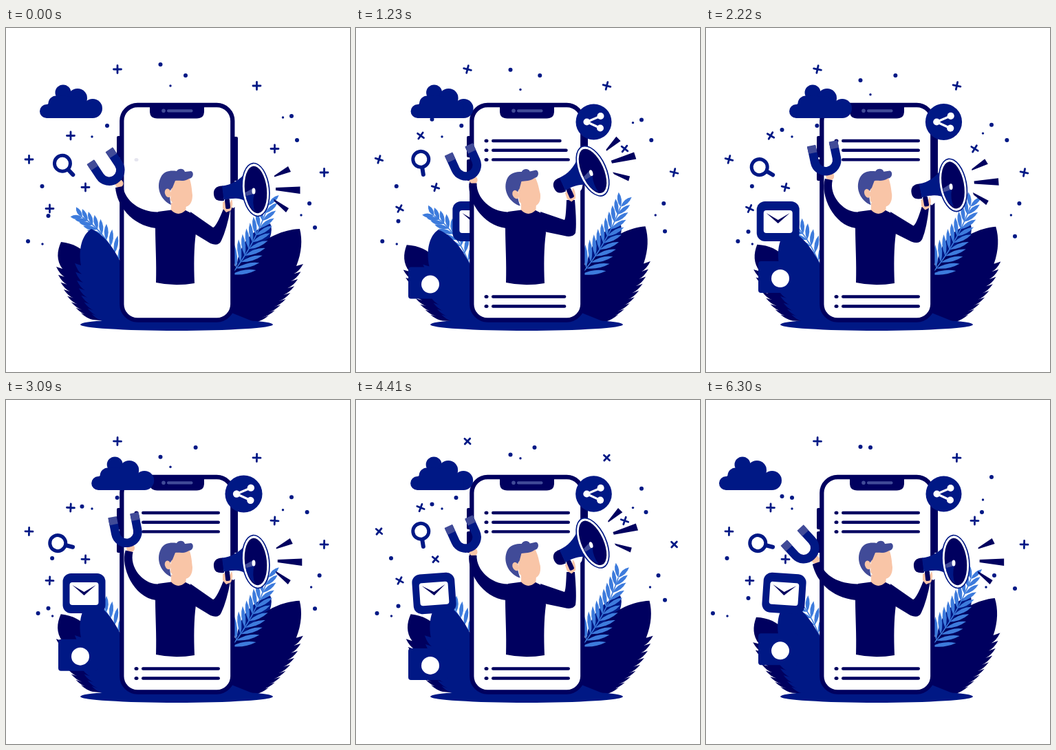
Animation, 500 px wide and 500 px high, one loop 6330 ms. Source, as an HTML page:

```html
<!DOCTYPE html>
<html lang="en">
<head>
<meta charset="utf-8">
<title>Mobile marketing</title>
<style>
  html, body { margin: 0; width: 100%; height: 100%; overflow: hidden; background: #fff; }
  svg { display: block; width: 100vw; height: 100vh; }
  .dark { fill: #00005f; }
  .blue { fill: #001885; }
  .soft { fill: #414b98; }
  .skin { fill: #f9c5a7; }
  .fern { fill: #3d7bdc; }
  .white { fill: #fff; }
</style>
</head>
<body>
<svg viewBox="0 0 500 500">
  <g id="fernL" class="fern"></g>
  <path id="leafL" class="dark"/>
  <path id="leafBlue" class="blue"/>
  <path id="leafBack" class="blue" d="M335 347Q340 300 384 284Q392 300 366 337Z"/>
  <path id="leafR" class="dark"/>
  <g id="fernR" class="fern"></g>
  <ellipse class="blue" cx="248" cy="431" rx="140" ry="9"/>
  <path class="blue" d="M300 430L328 414L368 430Z"/>

  <g id="camera">
    <rect class="blue" x="76" y="-23" width="58" height="46" rx="4"/>
    <circle class="white" cx="108" cy="2" r="13"/>
  </g>
  <g id="mail">
    <rect class="blue" x="-31" y="-29" width="62" height="58" rx="12"/>
    <rect class="white" x="-21" y="-16" width="42" height="33" rx="4"/>
    <path class="dark" d="M-17 -12L0 -2 17 -12 0 3Z"/>
  </g>
  <g id="marks" class="blue"></g>

  <g class="dark">
    <rect x="161" y="157" width="8" height="31" rx="2"/>
    <rect x="161" y="191" width="8" height="31" rx="2"/>
    <rect x="329" y="158" width="8" height="64" rx="2"/>
  </g>
  <rect x="168.300" y="112" width="161" height="312.500" rx="23" fill="#fff" stroke="#00005f" stroke-width="6.300"/>
  <path class="dark" d="M209 113H288V121Q288 131.500 277 131.500H220Q209 131.500 209 121Z"/>
  <circle class="soft" cx="229" cy="120.300" r="2.800"/>
  <rect class="soft" x="234" y="118.200" width="37.500" height="4.300" rx="2"/>
  <g id="list" class="dark"></g>

  <g id="cloud" class="blue">
    <circle cx="59" cy="121" r="10"/><circle cx="73" cy="110" r="11.500"/>
    <circle cx="83" cy="94" r="11.500"/><circle cx="104" cy="102" r="14"/>
    <circle cx="126" cy="117" r="14"/>
    <path d="M59 131V112L75 98 104 100 126 112V131Z"/>
  </g>

  <g id="lens" fill="none" stroke="#001885">
    <circle cx="-23.500" cy="0" r="11.500" stroke-width="5"/>
    <path d="M-11 0H-1" stroke-width="6" stroke-linecap="round"/>
  </g>

  <path class="skin" d="M240 254L262 256 261 268Q251 276 240 267Z"/>
  <path class="dark" d="M221 267L240 264.500Q250 275 261 265L273 271 276 298C273 320 273 345 274 371Q245 376 218 370C219 340 217 315 217 290Z"/>
  <g id="head">
    <path class="skin" d="M241 222L266 217C270 227 270 236 271 243C271 253 267 260 259 260C251 261 243 257 239 250Z"/>
    <path class="soft" d="M240 257C226 251 217 233 225 217C230 207 240 207 248 208C251 203 259 204 260 209L269 208C274 210 272 219 266 219C258 224 252 221 246 222L242 232C236 236 238 250 240 257Z"/>
    <ellipse class="skin" cx="235.500" cy="240" rx="4.500" ry="6.500" transform="rotate(-18 235 240)"/>
  </g>

  <g id="magnet">
    <ellipse class="skin" cx="164.500" cy="226" rx="6" ry="6"/>
    <g transform="translate(138.500 189) rotate(-33.500)">
      <path d="M-16.200 -3V21A16.200 16.200 0 0 0 16.200 21V-3" fill="none" stroke="#001885" stroke-width="12.500"/>
      <path class="soft" d="M-22.500 -4H-10V7H-22.500ZM10 -4H22.500V7H10Z"/>
    </g>
  </g>
  <path id="armL" class="dark"/>

  <path id="armR" class="dark"/>
  <g id="horn">
    <path class="white" d="M315 249L345 246 340 255 330 262 318 252Z"/>
    <path class="skin" d="M315 253L319 251 322 261 328 249Q331 255 327 265L320 268 315 262Z"/>
    <rect class="dark" x="318.500" y="248" width="7" height="15" rx="2" transform="rotate(-6 322 255)"/>
    <path class="dark" d="M315 229.500C306 229 301 234 302 242C303 250 308 252 317 251Z"/>
    <path class="blue" d="M314 229.500C328 228 338 222 350 209L353 255C342 246 330 247 316.500 249.500Z"/>
    <g transform="rotate(-6 363 235)">
      <ellipse class="blue" cx="363" cy="235" rx="20.500" ry="39.500"/>
      <ellipse class="white" cx="363" cy="235" rx="18.800" ry="37.800"/>
      <ellipse class="dark" cx="363" cy="235" rx="16" ry="34.500"/>
    </g>
    <path class="blue" d="M348 241L361 240Q357 255 362 267Q350 258 348 241Z"/>
    <path class="soft" d="M348 239L359 233 361 241 349 244Z"/>
    <ellipse class="white" cx="360" cy="237" rx="2.500" ry="4.500"/>
    <path id="beams" class="dark" d="M390 214.500L410 201 414 209 390 216.500ZM392 232L427.500 230.500V241L392 236ZM389 248.500L411 262 407 268 390 252Z"/>
  </g>

  <g id="share">
    <circle class="blue" r="26"/>
    <path d="M10 -8.500L-10 0 9.500 9" fill="none" stroke="#fff" stroke-width="3.200"/>
    <circle class="white" cx="-10" r="5"/><circle class="white" cx="10" cy="-8.500" r="5"/>
    <circle class="white" cx="9.500" cy="9" r="5"/>
  </g>
</svg>
<script>
const LOOP = 6330, HALF = LOOP / 2;
const $ = id => document.getElementById(id);
const place = (el, value) => el.setAttribute('transform', value);
const mix = (a, b, k) => a + (b - a) * k;

function add(parent, tag, attrs) {
  const el = document.createElementNS('http://www.w3.org/2000/svg', tag);
  for (const name in attrs) el.setAttribute(name, attrs[name]);
  return parent.appendChild(el);
}

// Eased progress from 0 to 1 between two times
function ramp(t, from, to) {
  const x = Math.min(1, Math.max(0, (t - from) / (to - from)));
  return x * x * x * (6 * x * x - 15 * x + 10);
}

// From 0 to a high point, then to a last value at the end of the loop
const swing = (t, peak, high, last) => high * ramp(t, 0, peak) + (last - high) * ramp(t, peak, LOOP);

// Up and back down, then rest, once per half loop
const pulse = t => ramp(t % HALF, 0, 1300) - ramp(t % HALF, 1300, 2720);

const curve = ([x0, y0, cx, cy, x1, y1], u) => {
  const v = 1 - u;
  return [v * v * x0 + 2 * u * v * cx + u * u * x1, v * v * y0 + 2 * u * v * cy + u * u * y1];
};

// Feathered edge along a curve; each tooth points out by dx
function teeth(edge, count, dx) {
  let d = '';
  for (let i = 0; i < count; i++) {
    const [x, y] = curve(edge, i / count), [nx, ny] = curve(edge, (i + 1) / count);
    d += `L${x} ${y}L${x + dx} ${y - 3}Q${mix(x, nx, 0.6) + dx * 0.6} ${mix(y, ny, 0.7)} ${nx} ${ny}`;
  }
  return d;
}
$('leafL').setAttribute('d', 'M168 400L120 332C110 320 98 313 80 311C74 324 73 338 82 350' +
  teeth([82, 350, 92, 398, 126, 424], 8, -9) + 'L168 428Z');
$('leafBlue').setAttribute('d', 'M185 428L168 343C158 322 144 301 124 292C110 301 105 322 109 345' +
  teeth([109, 345, 112, 398, 140, 426], 8, -9) + 'Z');
$('leafR').setAttribute('d', 'M310 428L328 347C340 344 350 336 365 319C378 305 402 293 427 292C431 308 430 326 422 346' +
  teeth([422, 346, 408, 398, 362, 428], 9, 10) + 'Z');

function fern(group, stem, count, size) {
  const [x0, y0, cx, cy, x1, y1] = stem;
  add(group, 'path', { d: `M${x0} ${y0}Q${cx} ${cy} ${x1} ${y1}`, fill: 'none', stroke: '#3d7bdc', 'stroke-width': 1.5 });
  for (let i = 0; i <= count; i++) {
    const u = i / count, len = size * (1 - 0.4 * u);
    const [x, y] = curve(stem, u), [nx, ny] = curve(stem, u + 0.01);
    const angle = Math.atan2(ny - y, nx - x) * 180 / Math.PI;
    for (const side of [-1, 1]) {
      add(group, 'path', {
        d: `M0 0Q${len * 0.55} -6.500 ${len} 0Q${len * 0.5} 5.500 0 0`,
        transform: `translate(${x} ${y}) rotate(${angle + side * (42 - 14 * u)})`,
      });
    }
  }
}
fern($('fernL'), [168, 350, 146, 296, 111, 275], 9, 29);
fern($('fernR'), [328, 358, 362, 315, 381, 258], 10, 36);

// Dots: x, y, radius, grouped by how they drift
const BIG = 3, SMALL = 1.7;
const slide = t => [swing(t, 2700, 15, -22), 0];
const fall = t => [0, swing(t, 3400, 30, 15)];
const bob = t => [0, swing(t, 2750, 13.5, -16)];
const drifts = [
  [slide, [147, 142, BIG], [261, 69, BIG], [441, 255, BIG], [53, 314, SMALL],
    [52.5, 230, BIG], [32, 310, BIG], [423, 163, BIG], [429, 272, SMALL]],
  [fall, [224.5, 53, BIG], [110.5, 125, BIG], [61.5, 273, BIG], [402.5, 130, SMALL]],
  [bob, [415, 128, BIG], [449, 290, BIG], [239, 84, SMALL]],
  [() => [0, 0], [125, 158, SMALL]],
].map(([move, ...dots]) => {
  const group = add($('marks'), 'g', {});
  for (const [cx, cy, r] of dots) add(group, 'circle', { cx, cy, r });
  return { move, group };
});

// Plus signs: x, y, tilt in the first half; the second half takes the rest of 60 degrees
const pluses = [
  [162, 60, 15], [364.5, 84, 15], [33.5, 191, 18], [94, 156.5, 38],
  [115.5, 231.5, 18], [63.5, 262.5, 30], [390.5, 175.5, 40], [462.5, 210, 14],
].map(([x, y, tilt]) => ({
  x, y, tilt,
  el: add($('marks'), 'path', { d: 'M-5.500 0H5.500M0 -5.500V5.500', stroke: '#001885', 'stroke-width': 2.8, 'stroke-linecap': 'round' }),
}));

// Text rows: three at the top, two at the bottom; lower rows start first
const rows = [0, 1, 2, 3, 4].map(i => {
  const top = i < 3, y = top ? 164 + 13.7 * i : 390.5 + 14 * (i - 3);
  return {
    dotAt: top ? 150 - 90 * i : 150,
    lineAt: top ? 485 - 100 * i : 420,
    dot: add($('list'), 'ellipse', { cx: 189.5, cy: y, rx: 3, ry: 2.5 }),
    line: add($('list'), 'rect', { x: 197, y: y - 2.2, height: 4.4, rx: 2.2 }),
  };
});

const turned = (x, y, deg) => {
  const a = deg * Math.PI / 180, dx = x - 200, dy = y - 262;
  return `${200 + dx * Math.cos(a) - dy * Math.sin(a)} ${262 + dx * Math.sin(a) + dy * Math.cos(a)}`;
};

function drawArms(turn, k) {
  $('armL').setAttribute('d',
    `M${turned(159, 232, turn)}C${turned(161, 257, turn)} ${182 + turn * 0.15} 287 218 291` +
    `L230 267L220 267.500C${195 + turn * 0.15} 267 ${turned(173, 252, turn)} ${turned(170, 230, turn)}Z`);
  const p = (x0, y0, x1, y1) => `${mix(x0, x1, k)} ${mix(y0, y1, k)}`;
  $('armR').setAttribute('d',
    `M268 267L${p(301, 290, 303, 279)}Q${p(306, 288, 305, 277)} ${p(316, 263, 306, 250)}` +
    `L${p(326, 264, 318, 250)}Q${p(321, 292, 321, 285)} ${p(313, 309, 319, 298)}` +
    `Q${p(309, 318, 315, 305)} ${p(297, 313, 303, 302)}L${p(274, 299, 274, 296)}Z`);
}

function draw(t) {
  const cloud = swing(t, 2750, 76, -30);
  const horn = pulse(t);
  const sway = ramp(t, 3900, LOOP) + ramp(t, 0, 1650) - ramp(t, 1650, 3400);
  const wave = Math.cos(2 * Math.PI * t / 4320);
  const turn = cloud * 0.3;

  place($('cloud'), `translate(${cloud} 0)`);
  place($('magnet'), `rotate(${turn} 200 262)`);
  drawArms(turn, horn);
  place($('horn'), `translate(${-14.5 * horn} ${-10.5 * horn}) rotate(${-18 * horn} 308 241)`);
  place($('beams'), `translate(${t * 0.0009} ${-3 * horn})`);
  place($('head'), `rotate(${-7 * horn} 252 268)`);
  place($('lens'), `translate(98 214) rotate(${mix(t < 1300 ? 47 : 14.5, 81, horn)})`);

  place($('leafL'), `rotate(${sway * -3.5} 155 428)`);
  place($('leafBlue'), `rotate(${sway * -2} 155 428)`);
  place($('leafR'), `rotate(${sway * -3} 345 428)`);
  place($('fernL'), `rotate(${sway * 2.5} 165 340)`);
  place($('fernR'), `rotate(${sway * 2.5} 330 350)`);

  const mailX = 215 - 111 * ramp(t, 700, 1900) + 9.5 * ramp(t, 2000, 3000);
  place($('mail'), `translate(${mailX} 281) rotate(${t > 3240 ? -4 * wave : 0})`);
  place($('camera'), `translate(108 ${373 + 11 * wave}) scale(${ramp(t, 300, 900)}) translate(-108 0)`);
  place($('share'), `translate(345.500 136.500) scale(${ramp(t, 350, 1000) * (1 + 0.04 * ramp(t, 1230, 3090) - 0.04 * ramp(t, 3090, 5310))})`);

  for (const { move, group } of drifts) place(group, `translate(${move(t).join(' ')})`);
  const tip = Math.sin(Math.PI * (t % HALF) / HALF);
  for (const { x, y, tilt, el } of pluses) {
    place(el, `translate(${x} ${y}) rotate(${tip * (t < HALF ? tilt : 60 - tilt)})`);
  }
  for (const { dotAt, lineAt, dot, line } of rows) {
    dot.setAttribute('opacity', Math.min(1, Math.max(0, (t - dotAt) / 300)));
    line.setAttribute('width', 114 * ramp(t, lineAt, lineAt + 1000));
  }
}

const start = performance.now();
function tick() {
  draw((performance.now() - start) % LOOP);
  requestAnimationFrame(tick);
}
tick();
</script>
</body>
</html>
```
